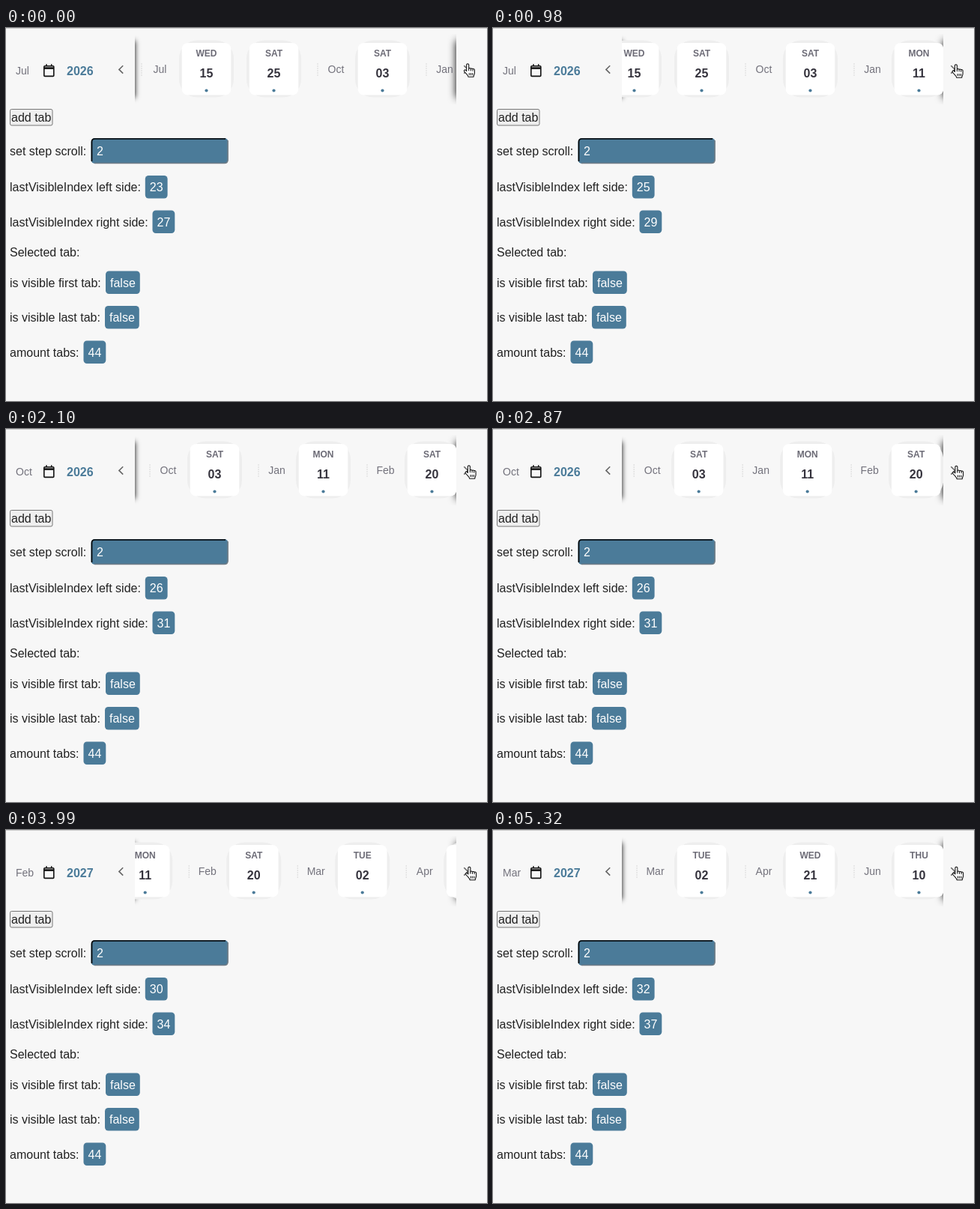
An HTML page for the animation above (5530 ms loop, 642 by 498 pixels).

```html
<!DOCTYPE html>
<html lang="en">
<head>
<meta charset="utf-8">
<title>Date tabs</title>
<style>
  html, body { margin: 0; width: 100%; height: 100%; overflow: hidden; background: #f7f7f7; }
  svg { display: block; width: 642px; height: 498px; font: 16px "Liberation Sans", Arial, sans-serif; fill: #222; }
  .accent { fill: #4b7b99; }
  .value { fill: #fff; }
  .month { font-size: 14px; fill: #73727c; }
  .weekday { font-size: 12px; font-weight: 700; fill: #6c6b76; }
  .date, .year { font-weight: 700; }
  .date { fill: #35333d; }
  .mid { text-anchor: middle; }
  .line { fill: none; stroke-width: 1.6; }
</style>
</head>
<body>
<svg viewBox="0 0 642 498">
  <defs>
    <clipPath id="view"><rect x="172" y="8" width="429" height="94"/></clipPath>
    <filter id="softLeft" x="-200%" width="500%" y="-30%" height="160%"><feGaussianBlur stdDeviation="3.8"/></filter>
    <filter id="softRight" x="-200%" width="500%" y="-30%" height="160%"><feGaussianBlur stdDeviation="5.5"/></filter>
  </defs>
  <rect width="642" height="498" fill="#f7f7f7"/>
  <path d="M0 .5H642" stroke="#cfcfcf"/>

  <text id="month" class="month" x="13" y="62"></text>
  <g class="line" stroke="#111">
    <rect x="50.8" y="50.8" width="13" height="13.6" rx="1"/>
    <path d="M50.8 53.6H63.8" stroke-width="2.6"/>
    <path d="M54 48.2V51M60.7 48.2V51"/>
  </g>
  <text id="year" class="year accent" x="81" y="63"></text>
  <path class="line" stroke="#666" d="M156.2 50.2L150.9 55.4L156.2 60.6"/>

  <g clip-path="url(#view)">
    <rect x="152" y="17" width="20" height="76" fill="#000" filter="url(#softLeft)"/>
    <rect x="601" y="17" width="24" height="76" fill="#000" filter="url(#softRight)"/>
    <g id="strip"></g>
  </g>
  <path class="line" stroke="#666" d="M611.3 50.2L616.6 55.4L611.3 60.6"/>

  <rect x="5.5" y="108.5" width="56.5" height="21.5" rx="2" fill="#efefef" stroke="#767676"/>
  <text x="7" y="125">add tab</text>
  <text x="5" y="169.5">set step scroll:</text>
  <rect class="accent" x="113.5" y="147" width="183" height="34" rx="5"/>
  <path class="line" stroke="#6f7c86" stroke-width="1" d="M296 150V176q0 4.5-4.5 4.5H118"/>
  <path class="line" stroke="#000" stroke-width="2" d="M114.5 178V152q0-4 4-4H293"/>
  <text class="value" x="121" y="169.5">2</text>
  <text x="5" y="305">Selected tab:</text>
  <g id="rows"></g>

  <g id="pointer">
    <path fill="#fff" stroke="#111" stroke-width="1.1" stroke-linejoin="round"
      d="M-1.6 8.5V.3a1.5 1.5 0 0 1 3 0V5.5a1.4 1.4 0 0 1 2.7.2a1.4 1.4 0 0 1 2.6.5a1.3 1.3 0 0 1 2.4.8V11c0 2-1.4 3-1.4 5.3H.8C.4 13.8-2 12.5-4.6 9c-1-1.6.8-2.8 2-1.6z"/>
    <path class="line" stroke="#111" style="stroke-width:1" d="M1.4 5.5V8.2M4.1 5.9V8.4M6.7 6.6V8.7M2 11V14.2M4.2 11V14.2M6.4 11V14.2"/>
    <circle id="ring" r="30.7" class="line" stroke="#111"/>
  </g>
</svg>
<script>
const LOOP = 5530, TICK = 70;
const VIEW_LEFT = 172, VIEW_RIGHT = 601, FIRST_INDEX = 23;
const $ = id => document.getElementById(id);

const groups = [
  ["Jul", "WED 15", "SAT 25"], ["Oct", "SAT 03"], ["Jan", "MON 11"], ["Feb", "SAT 20"],
  ["Mar", "TUE 02"], ["Apr", "WED 21"], ["Jun", "THU 10"]
];
const rows = [
  ["lastVisibleIndex left side:", 185.8, 197, "", "left"],
  ["lastVisibleIndex right side:", 195.5, 243.5, "", "right"],
  ["is visible first tab:", 133, 324.5, "false"],
  ["is visible last tab:", 132, 371, "false"],
  ["amount tabs:", 103.5, 417.5, "44"]
];
// Each click: ring on, ring off, scroll distance, scroll duration
const clicks = [
  [560, 700, 79, 215], [1610, 1750, 145, 288], [2660, 2800, 145, 288],
  [3710, 3780, 145, 288], [4830, 4970, 145, 288]
];
const moves = [[0, 616.3, 49], [140, 617.3, 49.5], [210, 618, 50], [2380, 618.5, 50.5]];

const tabs = [];
function buildStrip() {
  let x = 122.5, html = "";
  groups.forEach(([month, ...days], g) => {
    x += 145;
    const year = g < 2 ? 2026 : 2027;
    tabs.push({ month, year, from: x - 87, to: x - 35 });
    html += `<path d="M${x - 86.5} 47V65" stroke="#d9d9d9" stroke-dasharray="2 1"/>
      <text class="month mid" x="${x - 62}" y="60">${month}</text>`;
    days.forEach((day, i) => {
      if (i) x += 90;
      const [weekday, date] = day.split(" ");
      tabs.push({ month, year, from: x - 33, to: x + 33 });
      html += `<g transform="translate(${x})">
        <rect x="-36.5" y="16.5" width="73" height="76" rx="24" fill="#eee"/>
        <rect x="-32.8" y="20" width="65.6" height="69.5" rx="8" fill="#fff"/>
        <text class="weekday mid" y="37.5">${weekday}</text>
        <text class="date mid" y="66">${date}</text>
        <circle class="accent" cy="83.5" r="2.1"/></g>`;
    });
  });
  $("strip").innerHTML = html;
}

function buildRows() {
  $("rows").innerHTML = rows.map(([label, x, y, value, id]) => `
    <text x="5" y="${y + 21}">${label}</text>
    <rect class="accent" x="${x}" y="${y}" width="${value === "false" ? 45.8 : 29.8}" height="30.5" rx="4.5"/>
    <text class="value" x="${x + 6}" y="${y + 21}"${id ? ` id="${id}"` : ""}>${value}</text>`).join("");
}

const ease = p => (1 - Math.cos(Math.PI * Math.min(1, Math.max(0, p)))) / 2;

function draw(t) {
  const scroll = clicks.reduce((sum, [, off, distance, duration]) =>
    sum + distance * ease((t - off - 40) / duration), 0);
  $("strip").setAttribute("transform", `translate(${-scroll})`);

  const isVisible = ({ from, to }) => {
    const shown = Math.min(to - scroll, VIEW_RIGHT) - Math.max(from - scroll, VIEW_LEFT);
    return shown / (to - from) > 0.9;
  };
  const first = tabs.findIndex(isVisible), last = tabs.findLastIndex(isVisible);
  $("left").textContent = FIRST_INDEX + first;
  $("right").textContent = FIRST_INDEX + last;
  $("month").textContent = tabs[first].month;
  $("year").textContent = tabs[first].year;

  const [, x, y] = moves.findLast(([at]) => at <= t);
  $("pointer").setAttribute("transform", `translate(${x} ${y})`);
  const pressed = clicks.some(([on, off]) => t >= on && t < off);
  $("ring").style.visibility = pressed ? "visible" : "hidden";
}

let start;
function frame(now) {
  start ??= now;
  const t = (now - start + 1) % LOOP;
  draw(Math.floor(t / TICK) * TICK);
  requestAnimationFrame(frame);
}

buildStrip();
buildRows();
draw(0);
requestAnimationFrame(frame);
</script>
</body>
</html>
```
